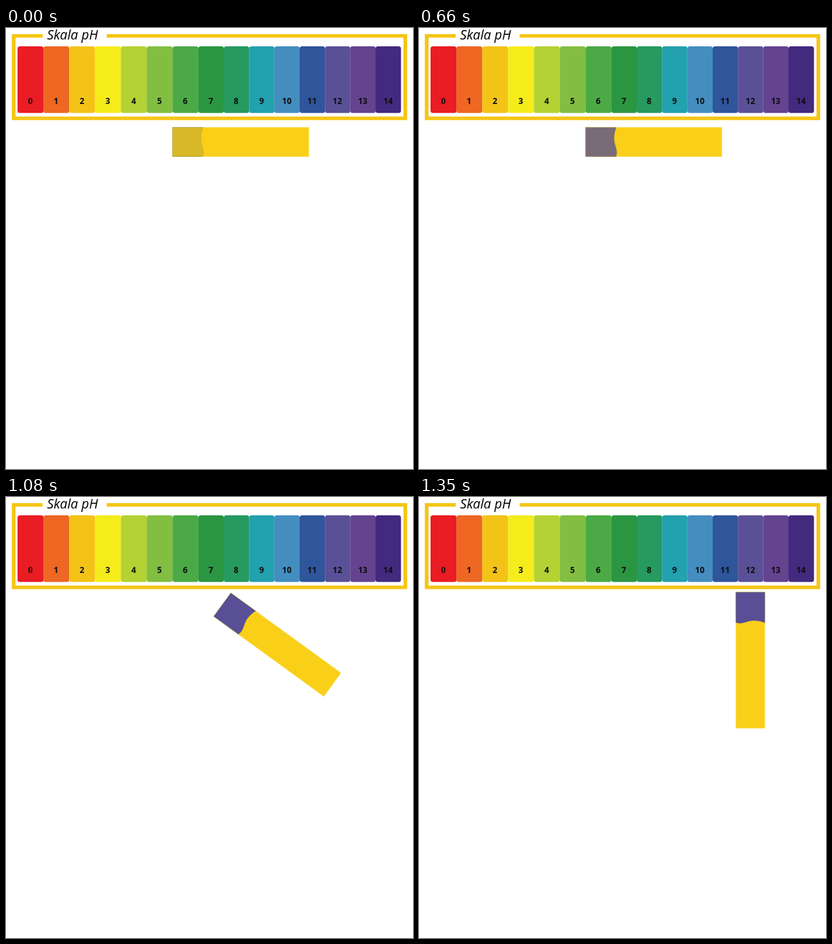
Recreate the animation shown at these times as an HTML page. Size 600x650 px, loop 1.38 s.

```html
<!DOCTYPE html>
<html lang="pl">
<head>
<meta charset="utf-8">
<title>Skala pH</title>
<style>
html, body { margin: 0; width: 100%; height: 100%; overflow: hidden; background: #fff; }
svg { display: block; width: 600px; height: 650px; }
.title { font: italic 19.3px "Open Sans", "Noto Sans", sans-serif; fill: #000; }
.num { font: bold 12.2px "Open Sans", "Noto Sans", sans-serif; fill: #0d0d0d; text-anchor: middle; }
.zero { font: bold 12px "Noto Serif", serif; }
</style>
</head>
<body>
<svg viewBox="0 0 600 650">
  <path d="M54 11.6H11.3V133.1H588.7V11.6H148.5" fill="none" stroke="#f5c515" stroke-width="5.4"/>
  <text class="title" x="60.5" y="17">Skala pH</text>
  <g id="scale"></g>
  <g id="strip">
    <rect x="-100.3" y="-21.4" width="200.6" height="42.8" fill="#facf17" stroke="#fbdf66" stroke-width=".8"/>
    <path id="tip" d="M-100.3 -21.4H-55C-59 -11 -59 -3 -56.5 5C-54 13 -53.5 17 -55.5 21.4H-100.3Z"/>
    <path d="M-55 -21.4H-100.3V21.4H-55.5" fill="none" stroke="#8c8256" stroke-opacity=".55" stroke-width=".9"/>
  </g>
</svg>
<script>
const NS = "http://www.w3.org/2000/svg";
const LOOP = 1380, STEP = 30, SOAK = 900, TURN = 450;
const colors = ["#ea1c24", "#ee6723", "#f4c318", "#f5ec1c", "#b4d234", "#82be41", "#4baa46",
  "#2b9642", "#269a5f", "#23a1ae", "#448ebf", "#2f559b", "#5a5097", "#64438f", "#432a7f"];
const dry = [216, 184, 40], wet = [88, 79, 150];

// way points of the strip centre: [progress, x, y]
const way = [[0, 346, 168], [8 / 15, 418, 234.2], [1, 488.5, 240.5]];

const scale = document.getElementById("scale");
const strip = document.getElementById("strip");
const tip = document.getElementById("tip");

function add(name, attrs, text = "") {
  const el = document.createElementNS(NS, name);
  for (const key in attrs) el.setAttribute(key, attrs[key]);
  el.textContent = text;
  scale.appendChild(el);
}

const edge = i => i <= 7 ? 17 + 38.1 * i : 283.7 + 37.3 * (i - 7);
const mix = (a, b, p) => a + (b - a) * p;
const clamp = p => Math.max(0, Math.min(1, p));

colors.forEach((fill, i) => {
  const x = edge(i), w = edge(i + 1) - x;
  add("rect", { x, y: 27, width: w + 0.2, height: 98.3, rx: 3.5, fill });
  add("text", { x: x + w / 2 - 0.3, y: 112, class: i ? "num" : "num zero" }, i);
});

function draw(ms) {
  const t = Math.floor((ms % LOOP) / STEP) * STEP;
  const soak = clamp(t / SOAK), turn = clamp((t - SOAK) / TURN);
  const rgb = dry.map((c, i) => Math.round(mix(c, wet[i], soak)));
  tip.setAttribute("fill", `rgb(${rgb})`);

  const k = turn < way[1][0] ? 0 : 1;
  const [p0, x0, y0] = way[k], [p1, x1, y1] = way[k + 1];
  const p = (turn - p0) / (p1 - p0);
  strip.setAttribute("transform",
    `translate(${mix(x0, x1, p)} ${mix(y0, y1, p)}) rotate(${90 * turn})`);
}

let start;
function tick(now) {
  start ??= now;
  draw(now - start);
  requestAnimationFrame(tick);
}
draw(0);
requestAnimationFrame(tick);
</script>
</body>
</html>
```
